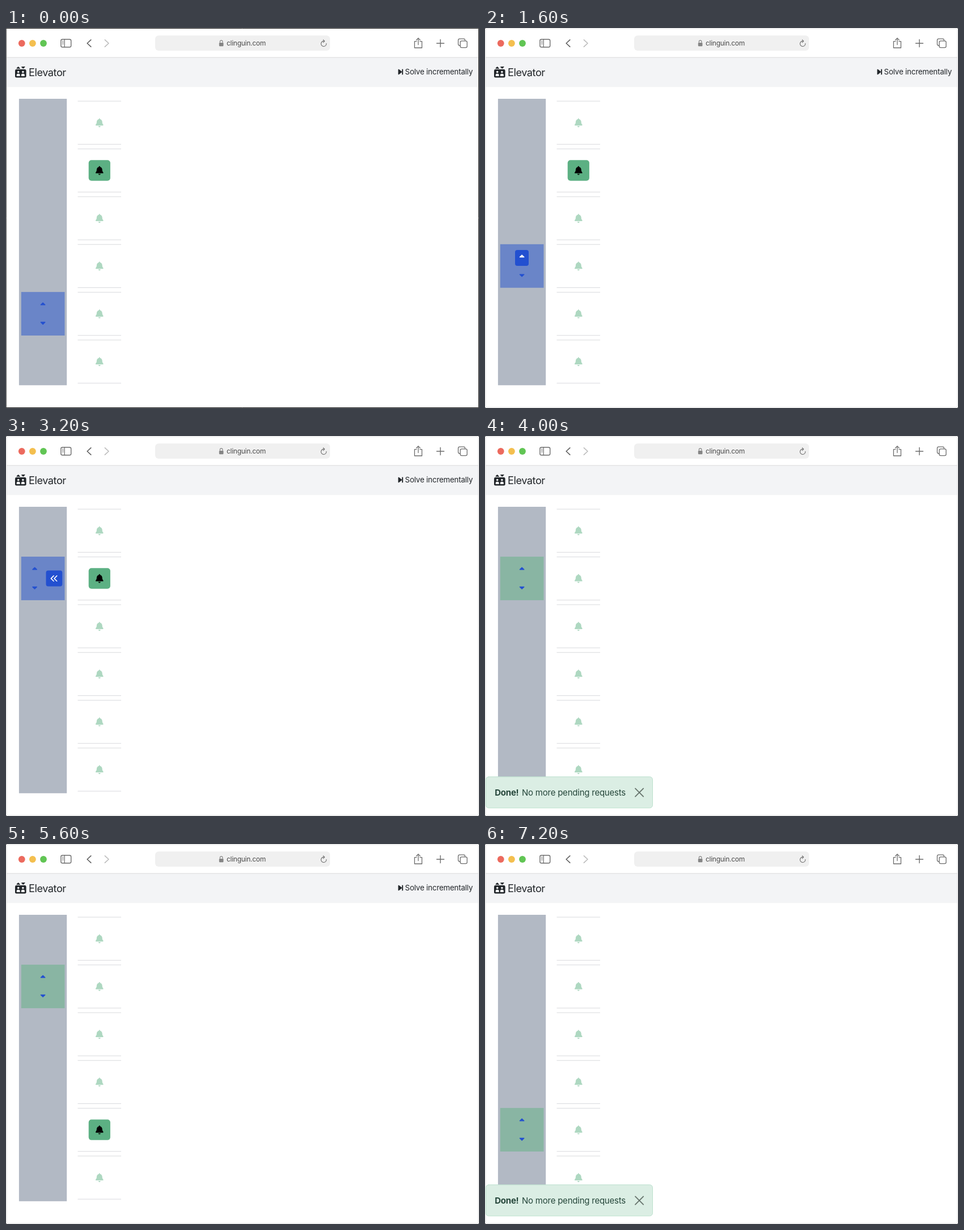
Recreate the animation shown at these times as an HTML page with a canvas. Size 834 px wide and 671 px high, loop 8 s.

```html
<!DOCTYPE html>
<html lang="en">
<head>
<meta charset="utf-8">
<title>Elevator</title>
<style>
html, body { margin: 0; width: 100%; height: 100%; overflow: hidden; background: #fff; }
canvas { display: block; width: 834px; height: 671px; }
</style>
</head>
<body>
<canvas id="stage"></canvas>
<script>
const W = 834, H = 671, STEP = 800;
const BLUE = '#2350d0', GREEN = '#5cb083', PALE = '#aed8c1', DARK = '#212529', HEADER = '#f3f4f6';

const canvas = document.getElementById('stage');
const ctx = canvas.getContext('2d');
const ratio = window.devicePixelRatio || 1;
canvas.width = W * ratio;
canvas.height = H * ratio;

// car: floor counted from the top; over: hovered control; call: requested floor
const steps = [
  { car: 4, call: 1, solve: 'plain', frame: true },
  { car: 4, call: 1, solve: 'plain', over: 'up' },
  { car: 3, call: 1, solve: 'plain', over: 'up' },
  { car: 2, call: 1, solve: 'plain', over: 'up' },
  { car: 1, call: 1, solve: 'plain', over: 'open' },
  { car: 1, done: true },
  { car: 1, done: true, hoverBell: 4 },
  { car: 1, call: 4, solve: 'plain', idle: true },
  { car: 1, call: 4, solve: 'hover', idle: true },
  { car: 4, done: true }
];

const bell = new Path2D('M224 0q-32 0-32 32v19C119 66 64 131 64 208v19C64 274 47 319 16 354l-8 9' +
  'C-9 382 4 416 32 416H416c28 0 41-34 24-53l-8-9C401 319 384 274 384 227v-19C384 131 329 66 256 51' +
  'V32Q256 0 224 0zM288 448H160a64 64 0 0 0 128 0z');

const floorTop = i => 128.9 + 84.36 * i;

function rect(x, y, w, h, color) {
  ctx.fillStyle = color;
  ctx.fillRect(x, y, w, h);
}

function box(x, y, w, h, r, fill, stroke, width = 1) {
  ctx.beginPath();
  ctx.roundRect(x, y, w, h, r);
  if (fill) { ctx.fillStyle = fill; ctx.fill(); }
  if (stroke) { ctx.strokeStyle = stroke; ctx.lineWidth = width; ctx.stroke(); }
}

function dot(x, y, r, color) {
  ctx.beginPath();
  ctx.arc(x, y, r, 0, 7);
  ctx.fillStyle = color;
  ctx.fill();
}

function line(points, color, width) {
  ctx.beginPath();
  points.forEach(([x, y]) => ctx.lineTo(x, y));
  ctx.strokeStyle = color;
  ctx.lineWidth = width;
  ctx.stroke();
}

function poly(points, color, round = 1) {
  ctx.beginPath();
  points.forEach(([x, y]) => ctx.lineTo(x, y));
  ctx.closePath();
  ctx.fillStyle = ctx.strokeStyle = color;
  ctx.lineWidth = round;
  ctx.fill();
  ctx.stroke();
}

function text(str, x, y, size, spacing, color, weight = 400) {
  ctx.font = `${weight} ${size}px Inter, sans-serif`;
  ctx.letterSpacing = spacing + 'px';
  ctx.fillStyle = color;
  ctx.fillText(str, x, y);
}

function caret(x, y, dir, color) {
  poly([[x - 3.7, y + 1.7 * dir], [x, y - 1.9 * dir], [x + 3.7, y + 1.7 * dir]], color, 1.4);
}

function drawBell(y, color) {
  const s = 0.0307;
  ctx.save();
  ctx.translate(164.8 - 224 * s, y - 256 * s);
  ctx.scale(s, s);
  ctx.fillStyle = color;
  ctx.fill(bell);
  ctx.restore();
}

function toolbar() {
  ['#ec6a5e', '#f4bf4f', '#61c554'].forEach((c, i) => dot(27.8 + 19.1 * i, 27, 5.9, c));

  const ink = '#6c6c6c';
  box(96.9, 20, 17.8, 13.8, 2.6, null, ink, 1.4);
  line([[103.2, 20], [103.2, 33.8]], ink, 1.2);
  for (const y of [23.2, 25.6, 28]) line([[99.1, y], [101.3, y]], ink, 0.9);
  line([[149.8, 20.8], [143.2, 27], [149.8, 33.2]], '#606060', 1.6);
  line([[174.4, 20.8], [181, 27], [174.4, 33.2]], '#bcbcbc', 1.6);

  box(263, 13.3, 308.3, 26.7, 6, '#f0f0f0');
  box(375.8, 26, 7.6, 6.2, 1.2, '#858585');
  ctx.beginPath();
  ctx.moveTo(377.3, 26.4);
  ctx.lineTo(377.3, 24.2);
  ctx.arc(379.6, 24.2, 2.3, Math.PI, 0);
  ctx.lineTo(381.9, 26.4);
  ctx.strokeStyle = '#858585';
  ctx.lineWidth = 1.1;
  ctx.stroke();
  text('clinguin.com', 389, 31.4, 12, -0.28, '#4c4c4c');

  ctx.beginPath();
  ctx.arc(560.2, 27.8, 4.7, -0.1, 4.9);
  ctx.strokeStyle = ink;
  ctx.lineWidth = 1.1;
  ctx.stroke();
  line([[559.4, 20.8], [561.8, 23.2], [559.4, 25.6]], ink, 1.1);

  line([[724, 23.6], [720.4, 23.6], [720.4, 35], [733.4, 35], [733.4, 23.6], [729.8, 23.6]], ink, 1.3);
  line([[726.9, 29.6], [726.9, 18.2]], ink, 1.3);
  line([[723.6, 21.2], [726.9, 17.9], [730.2, 21.2]], ink, 1.3);
  line([[759.4, 27], [772.4, 27]], ink, 1.4);
  line([[765.9, 20.5], [765.9, 33.5]], ink, 1.4);
  box(797.4, 19.2, 12, 11.8, 2.4, null, ink, 1.3);
  box(801, 22.8, 12, 11.8, 2.4, '#fff', ink, 1.3);
}

function brand() {
  poly([[18.8, 71.2], [21.6, 68.6], [24.4, 71.2]], DARK);
  poly([[27.4, 68.8], [30.2, 71.4], [33, 68.8]], DARK);
  box(16, 73, 19.6, 14.6, 2.4, DARK);
  for (const x of [21.7, 29.9]) {
    dot(x, 77.6, 1.8, HEADER);
    box(x - 3, 80.8, 6, 4.2, [2, 2, 0.6, 0.6], HEADER);
  }
  text('Elevator', 40, 84.8, 18.2, -0.47, DARK);
}

function solveButton(mode) {
  if (!mode) return;
  const ink = mode === 'hover' ? '#fff' : DARK;
  if (mode === 'hover') box(684, 63.7, 147.7, 27.8, 4, DARK);
  poly([[692.2, 73.4], [697.6, 77.5], [692.2, 81.6]], ink, 1.4);
  box(698.2, 72.5, 1.9, 10, 0.9, ink);
  text('Solve incrementally', 703.6, 82.3, 13.3, -0.18, ink);
}

function floors(s) {
  for (let i = 0; i < 6; i++) {
    const t = floorTop(i), y = t + 38.4;
    rect(126.5, t - 0.3, 76.5, 1.1, '#dcdde0');
    rect(126.5, t + 75.9, 76.5, 1.1, '#dcdde0');
    const called = s.call === i, hovered = s.hoverBell === i;
    if (called || hovered) box(145.7, t + 20.1, 38.2, 36.4, 5, called ? GREEN : PALE);
    drawBell(y, called ? '#000' : hovered ? '#808080' : PALE);
  }
}

function car(s) {
  const t = floorTop(s.car), open = s.over === 'open';
  const x = open ? 50.6 : 65.1;
  rect(26.8, t - 0.2, 76.7, 76.9, s.done || s.idle ? '#89b5a3' : '#6a85c8');
  if (s.over === 'up') box(53, t + 10.1, 24, 28, 4, BLUE);
  caret(x, t + 20.8, 1, s.over === 'up' ? '#fff' : BLUE);
  caret(x, t + 54.9, -1, BLUE);
  if (open) {
    box(70.5, t + 24.3, 28.8, 28, 4, BLUE);
    for (const cx of [79.4, 85]) {
      line([[cx + 4.7, t + 33.6], [cx, t + 38.3], [cx + 4.7, t + 43]], '#fff', 1.6);
    }
  }
}

function toast() {
  box(1.5, 601.8, 294, 55, 5, '#dbeee4', '#bce1ce');
  text('Done!', 17.2, 635, 15, -0.23, '#25463a', 700);
  text('No more pending requests', 65, 635, 15, -0.23, '#25463a');
  line([[265, 622.4], [279.2, 636.6]], '#68756e', 1.9);
  line([[279.2, 622.4], [265, 636.6]], '#68756e', 1.9);
}

function windowEdge(dark) {
  box(1, 1, W - 2, H - 2, 1, null, '#dcdcdc');
  if (dark) {
    box(0.5, 0.5, W - 1, H - 1, 0, null, '#1a1a1a');
  } else {
    for (const x of [0, W - 1]) for (const y of [0, H - 1]) rect(x, y, 1, 1, '#333');
  }
}

function draw(now) {
  const s = steps[Math.floor(now / STEP) % steps.length];
  ctx.setTransform(ratio, 0, 0, ratio, 0, 0);
  ctx.lineCap = ctx.lineJoin = 'round';
  rect(0, 0, W, H, '#fff');
  toolbar();
  rect(1, 52, W - 2, 52.3, HEADER);
  rect(1, 51.5, W - 2, 1, '#dadada');
  brand();
  solveButton(s.solve);
  rect(22.9, 125, 84.3, 505.8, '#b2b9c4');
  floors(s);
  car(s);
  windowEdge(s.frame);
  if (s.done) toast();
}

const start = performance.now();
function tick() {
  draw(performance.now() - start);
  requestAnimationFrame(tick);
}
tick();
</script>
</body>
</html>
```
